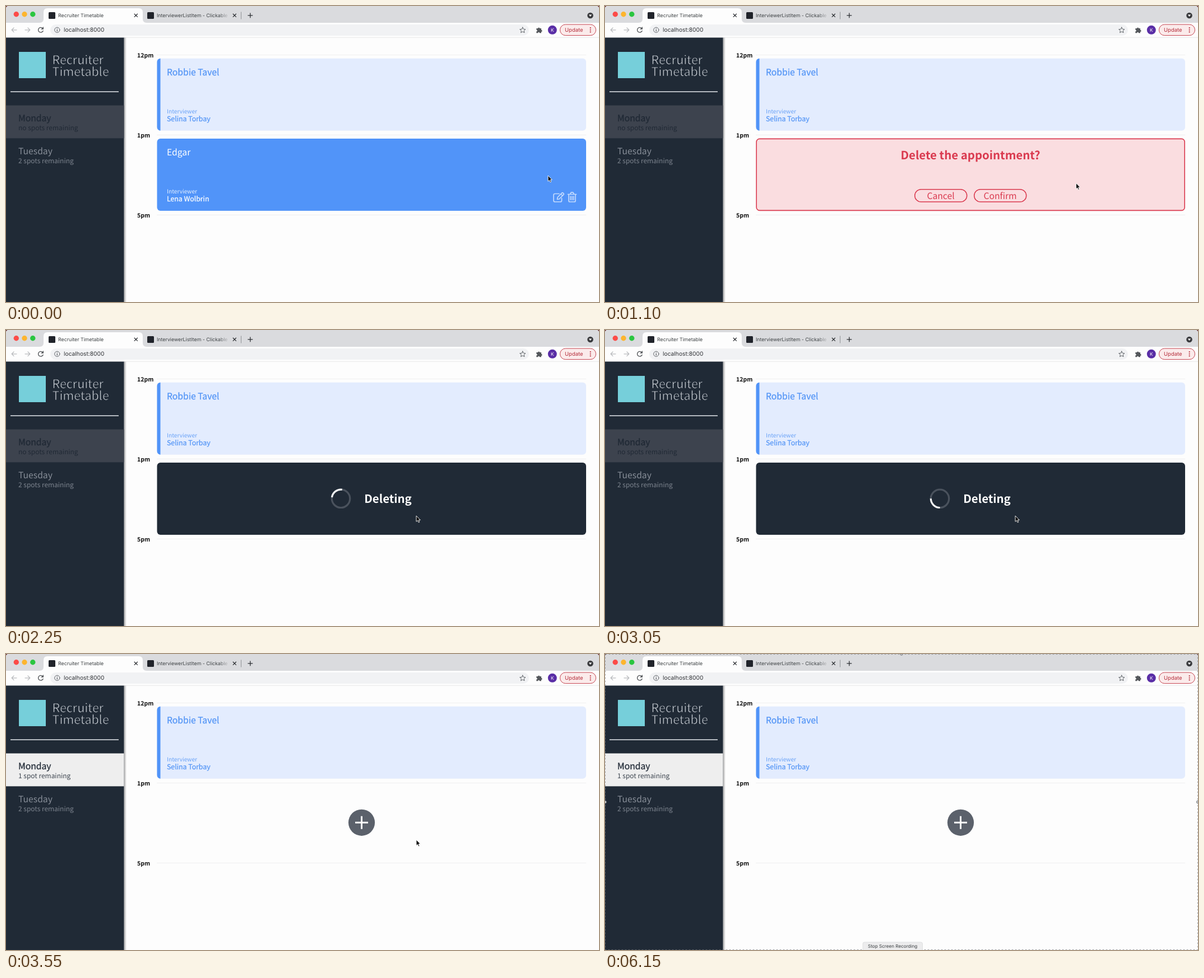
An HTML page that plays this animation: 1058x529 px, repeating every 6300 ms.

```html
<!DOCTYPE html>
<html lang="en">
<head>
<meta charset="utf-8">
<title>Recruiter Timetable</title>
<style>
  html, body { margin: 0; width: 100%; height: 100%; overflow: hidden; background: #fdfdfd; }
  svg { display: block; width: 1058px; height: 529px; }
  text { font-family: "Noto Sans CJK JP", "Noto Sans CJK SC", "Noto Sans", sans-serif; font-size: 15.7px; text-rendering: geometricPrecision; }
  .ui text { font-family: Inter, Roboto, sans-serif; font-size: 8.8px; fill: #3c4043; }
  .line { fill: none; stroke: #5f6368; stroke-width: 1.3; stroke-linecap: round; stroke-linejoin: round; }
  .brand { font-size: 21.5px; fill: #d5dae0; stroke: #202a36; stroke-width: .7px; }
  .time { font-size: 10.5px; font-weight: 700; fill: #111; }
  .head { stroke-width: .3px; }
  .label { font-size: 10.15px; opacity: .85; }
  .person { font-size: 12.3px; stroke-width: .25px; }
  .spots { font-size: 11.95px; }
  .big { font-size: 20.4px; font-weight: 700; }
  .mid { text-anchor: middle; }
</style>
</head>
<body>
<svg viewBox="0 0 1058 529">
  <defs>
    <linearGradient id="fade"><stop offset="0" stop-color="#dadbde" stop-opacity="0"/><stop offset="1" stop-color="#dadbde"/></linearGradient>
    <linearGradient id="shade"><stop offset="0" stop-color="#000" stop-opacity=".35"/><stop offset="1" stop-color="#000" stop-opacity="0"/></linearGradient>
    <clipPath id="card"><rect x="269.5" y="93.8" width="765.5" height="129" rx="6"/></clipPath>
  </defs>
  <rect width="1058" height="529" fill="#fdfdfd"/>

  <g class="ui">
    <rect width="1058" height="30" fill="#dadbde"/>
    <path d="M60 30Q67 30 67 23V11Q67 4 74 4H237Q244 4 244 11V23Q244 30 251 30Z" fill="#fdfdfd"/>
    <circle cx="18.3" cy="14.7" r="4.7" fill="#fc4b48"/>
    <circle cx="33" cy="14.7" r="4.7" fill="#fdb52e"/>
    <circle cx="47.8" cy="14.7" r="4.7" fill="#2bc640"/>
    <rect x="76" y="11" width="12" height="12" rx="1.5" fill="#20232a"/>
    <rect x="252" y="11" width="12" height="12" rx="1.5" fill="#20232a"/>
    <text x="93" y="20">Recruiter Timetable</text>
    <text x="269" y="20">InterviewerListItem - Clickable</text>
    <rect x="380" y="8" width="18" height="18" fill="url(#fade)"/>
    <path class="line" style="stroke:#2d3034" d="M229.2 14.2l5.2 5.2m0-5.2l-5.2 5.2M405.2 14.2l5.2 5.2m0-5.2l-5.2 5.2M431.8 16.8h8m-4-4v8"/>
    <path d="M419.5 10.5v13" stroke="#8f9296"/>
    <circle cx="1042.5" cy="17" r="5.3" fill="#3a3b3e"/>
    <path d="M1039.8 15.5h5.4l-2.7 3.4z" fill="#fff"/>

    <path d="M0 56.3H1058" stroke="#e2e3e5" stroke-width=".8"/>
    <rect x="79" y="33" width="854" height="20" rx="10" fill="#f1f2f4"/>
    <path class="line" style="stroke:#b9bbbe" d="M19 42.8H10.2m3.8-3.8l-3.8 3.8 3.8 3.8M34 42.8h8.8m-3.8-3.8l3.8 3.8-3.8 3.8"/>
    <path class="line" style="stroke:#45484c" d="M65.4 40a4.4 4.4 0 1 0 .7 4.4M66.3 38v3.2h-3.2"/>
    <circle class="line" style="stroke-width:1" cx="91.3" cy="42.8" r="4.6"/>
    <path class="line" d="M91.3 42.4v2.6m0-4.7v.1"/>
    <text x="103" y="46.4" style="font-size:10.25px;fill:#303236">localhost:8000</text>
    <path class="line" style="stroke-width:1" d="M921.8 38l1.5 3.3 3.6.4-2.7 2.4.8 3.6-3.2-1.9-3.2 1.9.8-3.6-2.7-2.4 3.6-.4z"/>
    <path d="M946.3 40h2.8a1.6 1.6 0 1 1 3.2 0h2.7v2.8a1.6 1.6 0 1 1 0 3.2v2.3h-3a1.5 1.5 0 0 0-3 0h-2.7v-2.8a1.5 1.5 0 0 0 0-3z" fill="#54575b"/>
    <circle cx="974.8" cy="42.8" r="8" fill="#5a2ea6"/>
    <text class="mid" x="974.8" y="45.8" style="fill:#fff;font-size:8.3px">K</text>
    <rect x="988.5" y="33" width="64" height="19.6" rx="9.8" fill="#fbebeb" stroke="#c4434f"/>
    <text x="997" y="46.2" style="font-size:9.5px;fill:#b52e3b">Update</text>
    <g fill="#b52e3b"><circle cx="1042.7" cy="39.2" r="1.1"/><circle cx="1042.7" cy="42.8" r="1.1"/><circle cx="1042.7" cy="46.4" r="1.1"/></g>
    <path d="M0 0h2.5L0 2.5zM1058 0h-2.5l2.5 2.5z" fill="#6d2b35"/>
  </g>

  <rect x="210.5" y="56.5" width="4.5" height="473" fill="url(#shade)"/>
  <rect y="56.5" width="210.5" height="473" fill="#202a36"/>
  <rect x="23" y="82" width="48" height="47" fill="#76cfda"/>
  <text class="brand" x="82.5" y="103.7">Recruiter</text>
  <text class="brand" x="82.5" y="125">Timetable</text>
  <path d="M8 153.2H201" stroke="#e4e8ec" stroke-width="1.6"/>
  <g id="full">
    <rect y="177.6" width="210.5" height="58.8" fill="#3d434e"/>
    <g fill="#202935"><text class="head" stroke="#202935" x="22" y="206">Monday</text><text class="spots" x="22" y="221.7">no spots remaining</text></g>
  </g>
  <g id="free">
    <rect y="177.6" width="210.5" height="58.8" fill="#eeeeee"/>
    <g fill="#262f3b"><text class="head" stroke="#262f3b" x="22" y="206">Monday</text><text class="spots" x="22" y="221.7" opacity=".88">1 spot remaining</text></g>
  </g>
  <g fill="#878e98"><text x="22" y="264.8">Tuesday</text><text class="spots" x="22" y="280.6" opacity=".9">2 spots remaining</text></g>

  <path d="M269 87.5H1035M269 230.5H1035M269 373.5H1035" stroke="#efeff0"/>
  <text class="time" x="234" y="91.5">12pm</text>
  <text class="time" x="234" y="234.6">1pm</text>
  <text class="time" x="234" y="377.6">5pm</text>
  <g clip-path="url(#card)">
    <rect x="269" y="93" width="767" height="130" fill="#e3ecfe"/>
    <rect x="269" y="93" width="6.5" height="130" fill="#5194f8"/>
  </g>
  <g fill="#5596f6">
    <text class="head" stroke="#5596f6" x="287" y="124">Robbie Tavel</text>
    <text class="label" x="287" y="191.7">Interviewer</text>
    <text class="person" stroke="#5596f6" x="287" y="206.4">Selina Torbay</text>
  </g>

  <g id="booked">
    <rect x="269.5" y="237" width="765.5" height="129" rx="6" fill="#5194f9"/>
    <g fill="#fff">
      <text x="287" y="267">Edgar</text>
      <text class="label" x="287" y="334.7">Interviewer</text>
      <text class="person" stroke="#fff" x="287" y="349.4">Lena Wolbrin</text>
    </g>
    <g class="line" style="stroke:#c3dafd;stroke-width:1.7">
      <path d="M987 335.5h-7.5q-2.5 0-2.5 2.5v9.5q0 2.5 2.5 2.5h9.5q2.5 0 2.5-2.5v-4M983.5 345.5l.5-3.5 7.8-7.8q1-1 2 0l1 1q1 1 0 2l-7.8 7.8zM990 336l3 3"/>
      <path d="M1002.5 336.5h15M1004 336.5v11.5q0 2 2 2h8q2 0 2-2v-11.5M1006.8 336l1.4-2.8h3.6l1.4 2.8M1007.2 340v6.5m2.8-6.5v6.5m2.8-6.5v6.5"/>
    </g>
  </g>

  <g id="confirm">
    <rect x="270.2" y="237.4" width="764" height="128" rx="5.5" fill="#fadde0" stroke="#da3a4f" stroke-width="1.6"/>
    <text class="big mid" x="652" y="273.5" fill="#da3a4f">Delete the appointment?</text>
    <g stroke="#da3a4f" stroke-width="1.5">
      <rect x="552.7" y="327.7" width="93" height="22.4" rx="11.2" fill="none"/>
      <rect id="pill" x="658.7" y="327.7" width="93" height="22.4" rx="11.2"/>
    </g>
    <text class="mid" x="599" y="345" fill="#da3a4f">Cancel</text>
    <text class="mid" id="pillText" x="705" y="345">Confirm</text>
  </g>

  <g id="deleting">
    <rect x="269.5" y="237" width="765.5" height="129" rx="6" fill="#202a36"/>
    <g fill="none" stroke-width="3.2">
      <circle cx="597.5" cy="301.3" r="16.2" stroke="#4a525d"/>
      <path id="arc" d="M586.05 312.75A16.2 16.2 0 0 1 586.05 289.85" stroke="#f4f5f6"/>
    </g>
    <text class="big" x="639.3" y="309.3" fill="#fff">Deleting</text>
  </g>

  <g id="add">
    <circle cx="634.5" cy="301.3" r="23.6" fill="#5b616b"/>
    <path d="M623 301.3h23m-11.5-11.5v23" stroke="#fff" stroke-width="3"/>
  </g>

  <g id="frame">
    <rect x=".5" y=".5" width="1057" height="528" fill="none" stroke="#74777b" stroke-opacity=".65" stroke-dasharray="3 3"/>
    <g fill="#c6c8ca" stroke="#5c5f64" stroke-width=".8"><circle cy="264.5" r="2.6"/><circle cx="1058" cy="264.5" r="2.6"/><circle cx="529" r="2.2"/><circle cx="529" cy="529" r="2.2"/></g>
  </g>
  <g id="tip" class="ui">
    <rect x="460" y="515" width="106.5" height="15" rx="3" fill="#ececed" stroke="#d6d7d9" stroke-width=".7"/>
    <text class="mid" x="513.2" y="525" style="font-size:8.15px">Stop Screen Recording</text>
  </g>

  <g id="cursor" stroke-linejoin="round">
    <path id="arrow" d="M0 0V10.4L2.4 8.3 4.1 12 5.8 11.2 4.2 7.6H7.3Z" fill="#0a0a0a" stroke="#fff" stroke-width=".9"/>
    <path id="hand" d="M-.9 6.2V1Q-.8 0 .1 0T1.1 1V4.3Q2.1 3.6 2.9 4.5 3.9 4 4.6 5 5.9 4.8 6 6.1V8.6Q5.9 10.3 4.9 12H-.2Q-1.4 10.4-3 8.2-3.7 7-2.8 6.6-1.8 6.3-.9 7.4ZM1.1 4.3V6.8M2.9 4.5V6.8M4.6 5V7" fill="#fff" stroke="#151515" stroke-width=".9"/>
  </g>
</svg>
<script>
  const LOOP = 6300, STEP = 50;
  const el = id => document.getElementById(id);
  const show = (id, on) => { el(id).style.display = on ? "" : "none"; };
  const ramp = (t, a, b) => Math.min(1, Math.max(0, (t - a) / (b - a)));
  const ease = k => k * k * (3 - 2 * k);

  // Start time of each scene
  const ASK = 600, REMOVE = 2100, DONE = 3150;
  // Pointer moves: from, to, end x, end y
  const start = [967, 303];
  const moves = [
    [50, 450, 1009, 337],
    [750, 1250, 794, 311],
    [1250, 1550, 732, 332],
    [3950, 4350, 655, 420],
    [5550, 5650, 617, 461]
  ];

  function pointer(t) {
    let [x, y] = start;
    for (const [a, b, px, py] of moves) {
      const k = ease(ramp(t, a, b));
      x += (px - x) * k;
      y += (py - y) * k;
    }
    return [x, y];
  }

  function draw(now) {
    const t = Math.floor(now % LOOP / STEP) * STEP;
    const [x, y] = pointer(t);
    const asking = t >= ASK && t < REMOVE;
    const hover = asking && x < 752 && y > 326;
    const hand = hover || (t < ASK && x > 1001 && y > 331);

    show("booked", t < ASK);
    show("confirm", asking);
    show("deleting", t >= REMOVE && t < DONE);
    show("add", t >= DONE);
    show("full", t < DONE);
    show("free", t >= DONE);

    el("pill").setAttribute("fill", hover ? "#da3a4f" : "none");
    el("pillText").setAttribute("fill", hover ? "#fff" : "#da3a4f");
    el("arc").setAttribute("transform", `rotate(${(t - 2088) / 1100 * 360} 597.5 301.3)`);

    show("cursor", t < 5700);
    show("arrow", !hand);
    show("hand", hand);
    el("cursor").setAttribute("transform", `translate(${x} ${y})`);

    el("frame").setAttribute("opacity", ramp(t, 5000, 5250));
    el("tip").setAttribute("opacity", ramp(t, 5900, 6150));
  }

  const begin = performance.now();
  function tick() {
    draw(performance.now() - begin);
    requestAnimationFrame(tick);
  }
  tick();
</script>
</body>
</html>
```
